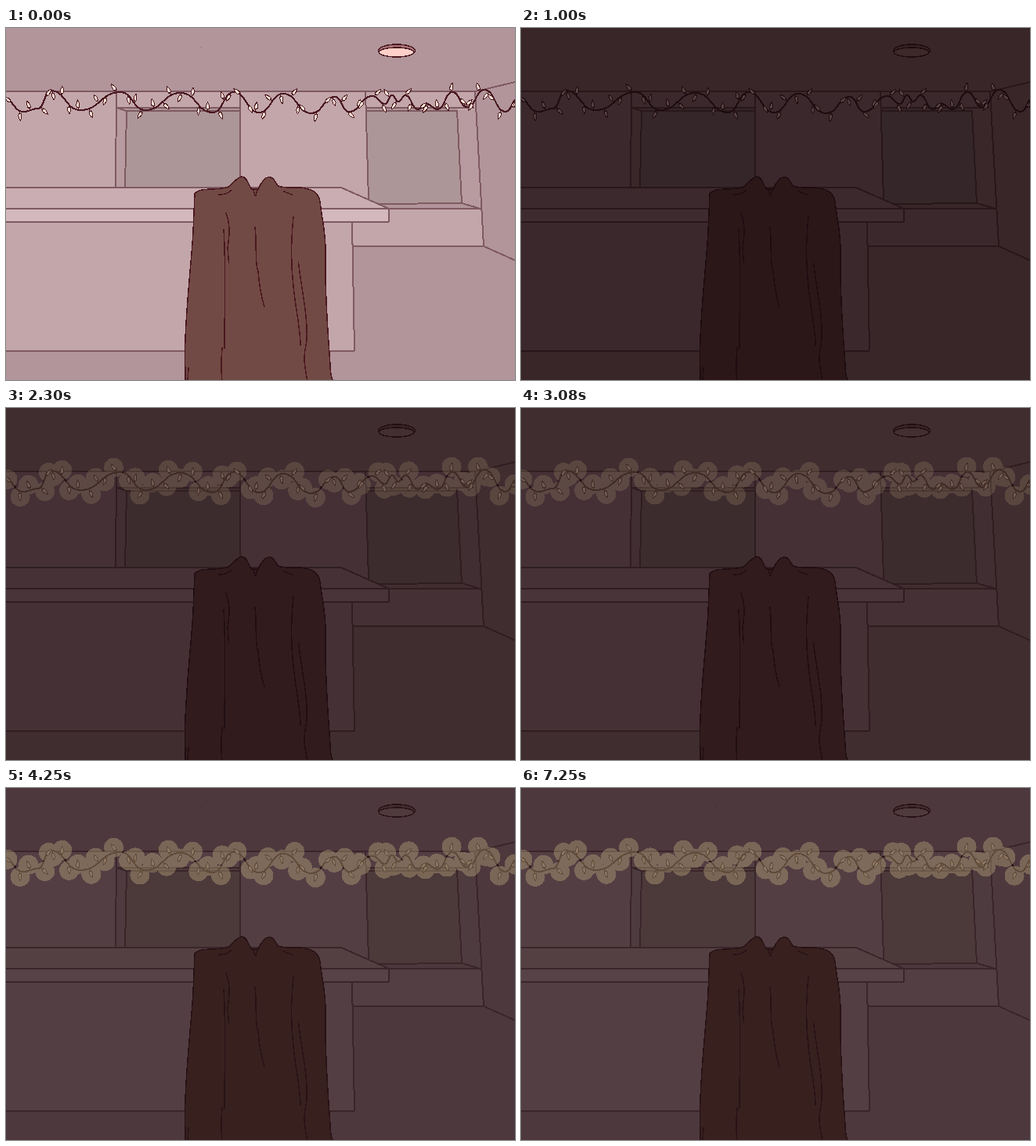
Recreate the animation shown at these times as an HTML page. Size 650 by 450 pixels, loop 9.25 s.

```html
<!DOCTYPE html>
<html lang="en">
<head>
<meta charset="utf-8">
<title>Fairy lights in a dark room</title>
<style>
html, body { margin: 0; width: 100%; height: 100%; overflow: hidden; }
svg { display: block; width: 650px; height: 450px; animation: lights 9.25s step-end infinite; }
.bg { fill: var(--bg); }
.wall { fill: var(--wall); }
.side { fill: var(--side); }
.top { fill: var(--top); }
.front { fill: var(--front); }
.pane { fill: var(--pane); }
.lamp { fill: var(--lamp); }
.rim { fill: var(--rim); }
.coat { fill: var(--coat); }
.line { fill: none; stroke: var(--line); stroke-width: 2; stroke-linejoin: round; }
.ink { stroke: var(--ink); stroke-width: 1.5; stroke-linecap: round; stroke-linejoin: round; }
.fold { fill: none; }
#wire { fill: none; stroke: var(--ink); stroke-width: 2.1; }
#bulbs { fill: var(--bulb); stroke: var(--ink); stroke-width: 1; }
#glow { fill: #d6c28c; opacity: var(--glow); }

/* room light on, off, then the string brightens in steps */
@keyframes lights {
  0% {
    --bg: #b1959a; --wall: #c2a6aa; --side: #b79ba0; --top: #c9adb2; --front: #d3b8bd;
    --pane: #ad9697; --line: #7f5a62; --coat: #724a45; --ink: #4a1820; --bulb: #ffe2d4;
    --rim: #a87376; --lamp: #ffd0c7; --glow: 0;
  }
  10.81% {
    --bg: #382628; --wall: #3b282c; --side: #39272a; --top: #3c292d; --front: #3e2b2f;
    --pane: #352629; --line: #28171a; --coat: #2b1718; --ink: #1d0c10; --bulb: #553f40;
    --rim: #332023; --lamp: #3d282a; --glow: 0;
  }
  24.86% {
    --bg: #402d30; --wall: #443035; --side: #412e32; --top: #453136; --front: #483439;
    --pane: #3d2c2e; --line: #2f1d21; --coat: #311b1d; --ink: #210e12; --bulb: #5b4544;
    --rim: #382427; --lamp: #432e31; --glow: .17;
  }
  38.91% {
    --bg: #483538; --wall: #4d393e; --side: #49363a; --top: #4e3a3e; --front: #513d41;
    --pane: #463537; --line: #362327; --coat: #351d1e; --ink: #251014; --bulb: #624c48;
    --rim: #3d282b; --lamp: #4a3538; --glow: .26;
  }
  45.94%, 100% {
    --bg: #4d393d; --wall: #533f43; --side: #4e3b3f; --top: #543f43; --front: #574347;
    --pane: #4c393a; --line: #3a262a; --coat: #38201f; --ink: #281215; --bulb: #66504b;
    --rim: #412c2f; --lamp: #4f3a3d; --glow: .33;
  }
}
</style>
</head>
<body>
<svg viewBox="0 0 650 450" shape-rendering="crispEdges">
  <rect class="bg" width="650" height="450"/>

  <!-- back wall and windows -->
  <path class="wall" d="M0 81H599L610 279H0Z"/>
  <path class="side" d="M141 102L154 106L152 204H140ZM576 105H600L606 231L582 224Z"/>
  <path class="pane" d="M154 102H299V204H152ZM460 102H576L582 224L470 225L463 219Z"/>
  <path class="bg" d="M470 225L582 224L606 231H489Z"/>
  <g class="line">
    <path d="M0 81H599L613 78L650 69M599 81L610 279L650 297"/>
    <path d="M141 81L140 204M152 204L154 106L142 102H299M154 105.500H299M299 81V204"/>
    <path d="M459 81L463 219M460 102H598M461 105.500H576L582 224L606 231M470 225L582 224"/>
    <path d="M489 231H606"/>
    <path d="M442 279H611" stroke-width="2.6"/>
  </g>

  <!-- counter -->
  <path class="wall" d="M0 247H442L445 412H0Z"/>
  <path class="top" d="M0 204H428L489 231H0Z"/>
  <path class="front" d="M0 231H489V247.500H0Z"/>
  <path class="line" d="M0 204H428L489 231V247.500H0M0 231H489M442 248L445 412.500H0"/>

  <!-- ceiling lamp -->
  <ellipse class="rim ink" cx="499" cy="29" rx="23.5" ry="8" stroke-width="2"/>
  <ellipse class="lamp ink" cx="498.500" cy="31" rx="22" ry="6"/>
  <circle cx="249.500" cy="24.500" r=".7" fill="var(--line)"/>

  <!-- draped coat -->
  <path class="coat ink" d="M229 452L228.500 412C230 350 237 300 239 260L241 212Q244 208 250 207
    C262 205 275 207 284 203C291 199 294 191 301 190C309 191 310 203 314 206H322
    C326 197 330 191 336 190.500C344 191 344 200 348 202C358 206 372 202 382 205
    C393 207 399 211 401 222C404 248 409 265 408 290C407 340 411 390 414 430Q414 445 418 452Z"/>
  <g class="ink fold">
    <path d="M281 237C287 252 285 268 283 281L284.500 300M278 258C281 300 279 360 279 409M276 409Q274 432 276 452"/>
    <path d="M318 255C321 280 317 300 322 311Q324 338 330 356"/>
    <path d="M367 242C363 280 364 305 367 330C370 360 376 385 376 405"/>
    <path d="M373.500 300C377 332 386 370 384 400C379 425 381 428 385 452"/>
    <path d="M233 435L232 452M316 207L318 214M321 207L319 214M272 213Q283 213 287 208M355 209L365 213"/>
  </g>

  <path id="wire"/>
  <g id="bulbs"></g>
  <g id="glow"></g>
</svg>
<script>
// crests and troughs of the wire
const turns = [
  [-2, 91], [22, 107], [41, 103], [57, 80], [95, 105], [146, 82], [178, 105], [223, 83],
  [264, 108], [291, 82], [323, 108], [354, 84], [390, 109], [420, 88], [438, 107], [468, 87],
  [484, 97], [493, 86], [501, 94], [510, 86], [526, 104], [537, 97], [551, 104], [570, 82],
  [589, 101], [611, 79], [638, 107], [654, 90]
];
const BULBS = 62, REACH = 7.5, HALO = 12.5;

const byId = id => document.getElementById(id);

function add(parent, tag, attrs) {
  const el = document.createElementNS("http://www.w3.org/2000/svg", tag);
  for (const key in attrs) el.setAttribute(key, attrs[key]);
  parent.append(el);
}

let seed = 11;
function random() {
  seed = seed * 16807 % 2147483647;
  return seed / 2147483647;
}

// level at every turn, S-shaped in between
const wire = byId("wire");
wire.setAttribute("d", turns.map(([x, y], i) => {
  if (!i) return `M${x} ${y}`;
  const [px, py] = turns[i - 1], mid = (px + x) / 2;
  return `C${mid} ${py} ${mid} ${y} ${x} ${y}`;
}).join(""));

// bulbs sit evenly on the wire, alternately above and below, each with its own lean
const gap = wire.getTotalLength() / BULBS;
for (let i = 0; i < BULBS; i++) {
  const root = wire.getPointAtLength((i + 0.8) * gap);
  const side = i % 2 ? 90 : -90;
  const angle = side + (random() - 0.5) * 100;
  const x = root.x + REACH * Math.cos(angle * Math.PI / 180);
  const y = root.y + REACH * Math.sin(angle * Math.PI / 180);
  add(byId("bulbs"), "path", {
    d: "M-7 0H-4M-4 -1.500Q0 -3 5 0Q0 3 -4 1.500Z",
    transform: `translate(${x} ${y}) rotate(${angle})`
  });
  add(byId("glow"), "circle", { cx: x, cy: y, r: HALO });
}
</script>
</body>
</html>
```
